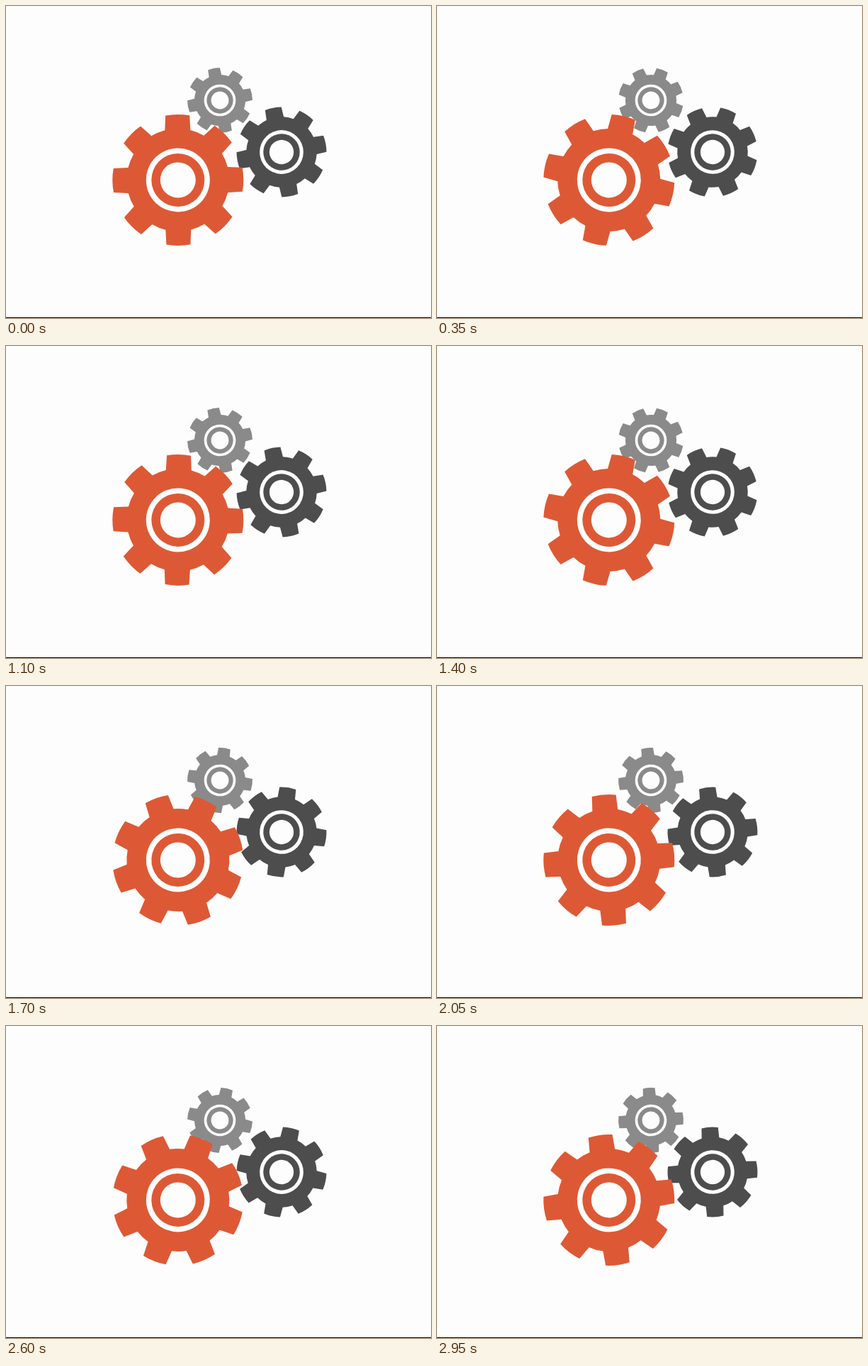
An HTML page with a canvas for the animation above (3000 ms loop, 600 px wide and 440 px high).

```html
<!DOCTYPE html>
<html lang="en">
<head>
<meta charset="utf-8">
<title>Gears</title>
<style>
  html, body { margin: 0; width: 100%; height: 100%; overflow: hidden; background: #fdfdfd; }
  canvas { display: block; width: 600px; height: 440px; }
</style>
</head>
<body>
<canvas id="stage" width="600" height="440"></canvas>
<script>
const ctx = document.getElementById('stage').getContext('2d');
const LOOP = 3000, STEP = 50, TEETH = 8;
const PAPER = '#fdfdfd';
const RAD = Math.PI / 180;

// Gear proportions at full size
const TIP_R = 92.5, ROOT_R = 72.5, TIP_HALF = 17, ROOT_HALF = 18;

// Back to front; small gears turn against the large one
const GEARS = [
  { x: 302, y: 133, size: 0.497, color: '#8a8a8a', dir: -1, phase: -11.25 },
  { x: 389, y: 206, size: 0.686, color: '#4d4d4d', dir: -1, phase: -11.25 },
  { x: 242.8, y: 245.4, size: 1, color: '#dd5935', dir: 1, phase: 0 }
];

// Turn of the large gear: [ms, degrees]
const TURN = [[0, -0.4], [350, 13], [800, 33.6], [1400, 58],
              [2050, 85.5], [2600, 111.3], [2950, 127.3]];

function turnAt(t) {
  let i = 1;
  while (i < TURN.length - 1 && t > TURN[i][0]) i++;
  const [t0, a0] = TURN[i - 1], [t1, a1] = TURN[i];
  return a0 + (a1 - a0) * (t - t0) / (t1 - t0);
}

function disc(r, color) {
  ctx.fillStyle = color;
  ctx.beginPath();
  ctx.arc(0, 0, r, 0, Math.PI * 2);
  ctx.fill();
}

function drawGear(g, turn) {
  const tip = Math.asin(TIP_HALF / TIP_R), root = Math.asin(ROOT_HALF / ROOT_R);
  const pitch = Math.PI * 2 / TEETH;
  ctx.save();
  ctx.translate(g.x, g.y);
  ctx.scale(g.size, g.size);
  ctx.rotate((g.phase + g.dir * turn) * RAD);
  ctx.beginPath();
  for (let i = 0; i < TEETH; i++) {
    const a = i * pitch - Math.PI / 2;
    ctx.arc(0, 0, ROOT_R, a - pitch + root, a - root);
    ctx.arc(0, 0, TIP_R, a - tip, a + tip);
  }
  ctx.closePath();
  ctx.fillStyle = g.color;
  ctx.fill();
  disc(45, PAPER);
  disc(37.5, g.color);
  disc(25, PAPER);
  ctx.restore();
}

function draw(t) {
  ctx.fillStyle = PAPER;
  ctx.fillRect(0, 0, 600, 440);
  const turn = turnAt(t);
  GEARS.forEach(g => drawGear(g, turn));
  ctx.fillStyle = '#000';
  ctx.fillRect(0, 439, 600, 1);
}

const start = performance.now();
function tick() {
  const t = (performance.now() - start) % LOOP;
  draw(Math.floor(t / STEP) * STEP);
  requestAnimationFrame(tick);
}
tick();
</script>
</body>
</html>
```
